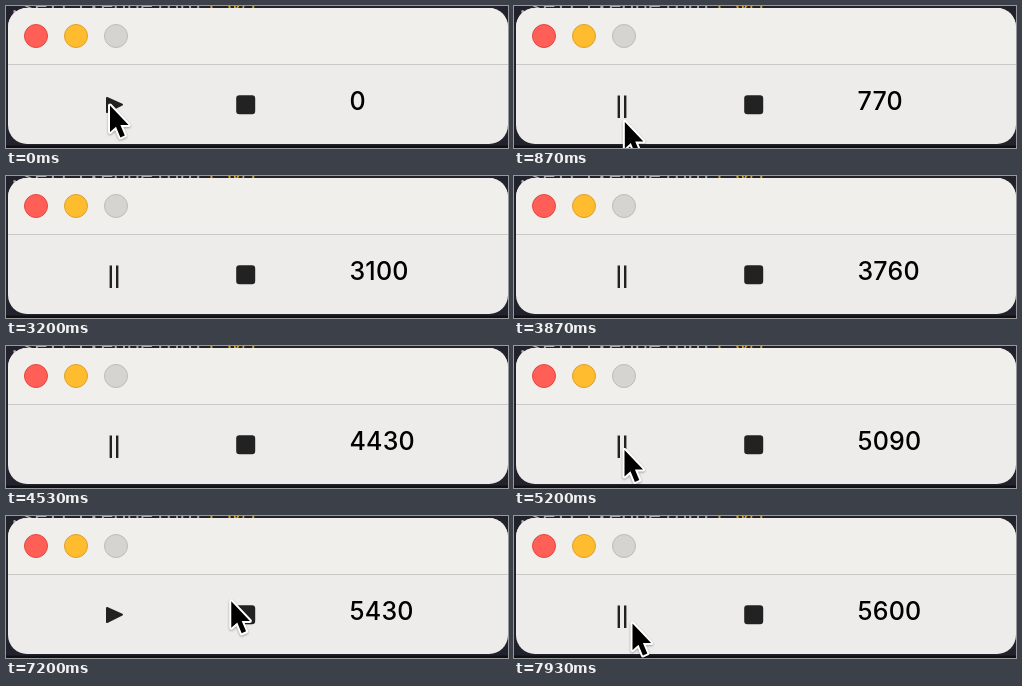
Write an HTML page that moves like this. It is 502x142 px and loops after 8000 ms.

```html
<!DOCTYPE html>
<html lang="en">
<head>
<meta charset="utf-8">
<title>Stopwatch</title>
<style>
  html, body { margin: 0; width: 100%; height: 100%; overflow: hidden; background: #22222d; }
  svg { display: block; }
  .code { font: 22px "Noto Sans Mono", monospace; fill: #aaa8b0; }
  #count { font: 500 25px Inter, sans-serif; letter-spacing: 0.2px; fill: #000; }
</style>
</head>
<body>
<svg width="502" height="142" viewBox="0 0 502 142">
  <rect width="502" height="142" fill="#22222d"/>
  <rect y="139.5" width="502" height="3" fill="#101015"/>
  <text class="code" x="2" y="7">.setFixedHeight<tspan fill="#d9a520">(50)</tspan></text>

  <rect x="2" y="2" width="500" height="136" rx="19" fill="#eeecea"/>
  <path d="M2 58V21a19 19 0 0 1 19-19h462a19 19 0 0 1 19 19V58z" fill="#f1efeb"/>
  <path d="M2 58.5h500" stroke="#cbc9c6"/>

  <circle cx="30" cy="30" r="11.5" fill="#ff5f57" stroke="#e2483f"/>
  <circle cx="70" cy="30" r="11.5" fill="#febc2e" stroke="#dea02a"/>
  <circle cx="110" cy="30" r="11.5" fill="#d5d4d1" stroke="#bdbcb9"/>

  <path id="play" d="M101 92L116 98.7 101 106z" fill="#222" stroke="#222" stroke-width="2" stroke-linejoin="round"/>
  <path id="pause" d="M104.8 89.5V112M111.2 89.5V112" stroke="#222" stroke-width="2.4"/>
  <rect x="230.2" y="89.2" width="19" height="19" rx="3.2" fill="#222"/>
  <text id="count" x="343.5" y="104"></text>

  <path id="cursor" d="M0 0V26.5L6 21.2 10.4 32 14.8 30 10.4 19.6H18.6z" fill="#000" stroke="#fff" stroke-width="4"
        paint-order="stroke" stroke-linejoin="round" style="filter: drop-shadow(0 1px 1px #0005)"/>
</svg>
<script>
const $ = id => document.getElementById(id);
const LOOP = 8000, FPS = 15;
const START = 93, PAUSE_AT = 5430, RESUME = 7760;

// Pointer moves; arc bends the path up or down
const moves = [
  { from: 600, to: 1300, x: 125, y: 150 },
  { from: 4500, to: 5050, x: 110.5, y: 104 },
  { from: 6133, to: 6500, x: 120, y: 123 },
  { from: 6500, to: 7000, x: 253, y: 98 },
  { from: 7000, to: 7720, x: 106, y: 100, arc: -17 },
  { from: 7867, to: 7933, x: 118.5, y: 107.5 }
];

const ease = k => k * k * (3 - 2 * k);

function pointer(t) {
  let x = 104, y = 99.5;
  for (const m of moves) {
    const k = Math.min(1, Math.max(0, (t - m.from) / (m.to - m.from)));
    x += (m.x - x) * ease(k);
    y += (m.y - y) * ease(k) + (m.arc || 0) * Math.sin(Math.PI * k);
  }
  return [x, y];
}

function elapsed(t) {
  const first = Math.min(PAUSE_AT, Math.max(0, (t - START) * 0.998));
  return Math.floor((first + Math.max(0, t - RESUME)) / 10) * 10;
}

function draw(now) {
  // The screen refreshes 15 times a second
  const t = Math.floor((now % LOOP + 5) * FPS / 1000) * 1000 / FPS % LOOP;
  const running = t > 60 && t < 5590 || t > RESUME;
  $("play").style.display = running ? "none" : "";
  $("pause").style.display = running ? "" : "none";
  $("count").textContent = elapsed(t);
  $("cursor").setAttribute("transform", `translate(${pointer(t)})`);
}

const start = performance.now();
function tick() {
  draw(performance.now() - start);
  requestAnimationFrame(tick);
}
tick();
</script>
</body>
</html>
```
